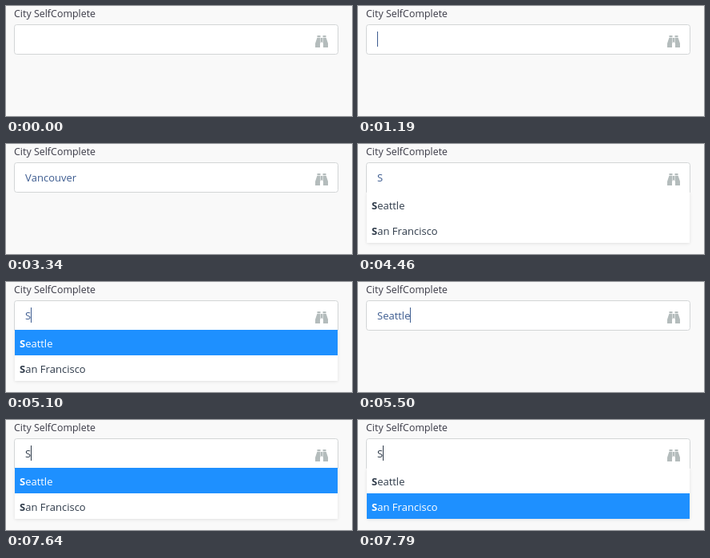
An HTML page with a canvas for the animation above (8000 ms loop, 433 by 138 pixels).

```html
<!DOCTYPE html>
<html lang="en">
<head>
<meta charset="utf-8">
<title>City field</title>
<style>
  html, body { margin: 0; width: 100%; height: 100%; overflow: hidden; background: #f9f9f9; }
  canvas { display: block; }
</style>
</head>
<body>
<canvas id="stage" width="433" height="138"></canvas>
<script>
const ctx = document.getElementById('stage').getContext('2d');
const LOOP = 8000;
const FAMILY = '"Open Sans", "Noto Sans", sans-serif';
const INK = '#2f3b4a', BLUE = '#3d5c90', ACCENT = '#1e90ff';
const TEXT_X = 24, ROW_H = 32, LIST_Y = 60;
const CARET_X = { '': 24, V: 33, S: 31, Vancouver: 88, Seattle: 65 };

// Each step changes only the listed parts of the field.
const EMPTY = { text: '', caret: false, select: null, rows: [], active: -1, ink: BLUE };
const steps = [
  [0, {}],
  [80, { caret: true }],
  [640, { caret: false }],
  [1190, { caret: true }],
  [1760, { text: 'V', rows: ['Vancouver'], ink: INK }],
  [2310, { caret: false }],
  [2560, { caret: true, active: 0 }],
  [2790, { caret: false }],
  [3020, { text: 'Vancouver', caret: true, rows: [], active: -1, ink: BLUE }],
  [3340, { caret: false }],
  [3660, { select: [24, 89] }],
  [4460, { text: 'S', select: null, rows: ['Seattle', 'San Francisco'] }],
  [5010, { caret: true }],
  [5100, { active: 0 }],
  [5500, { text: 'Seattle', rows: [], active: -1 }],
  [6060, { caret: false }],
  [6530, { select: [24, 65] }],
  [6760, { select: [31, 65], ink: INK }],
  [7160, { text: 'S', select: null, caret: true, rows: ['Seattle', 'San Francisco'] }],
  [7640, { active: 0 }],
  [7790, { active: 1 }]
];

function stateAt(time) {
  const state = { ...EMPTY };
  for (const [start, change] of steps) {
    if (start > time) break;
    Object.assign(state, change);
  }
  return state;
}

function rect(x, y, w, h, color) {
  ctx.fillStyle = color;
  ctx.fillRect(x, y, w, h);
}

function label(text, x, y, color, size = 13, weight = 400) {
  ctx.font = `${weight} ${size}px ${FAMILY}`;
  ctx.fillStyle = color;
  ctx.fillText(text, x, y);
  return ctx.measureText(text).width;
}

function polygon(points) {
  ctx.beginPath();
  points.forEach(([x, y]) => ctx.lineTo(x, y));
  ctx.closePath();
  ctx.fill();
}

function drawBinoculars() {
  ctx.fillStyle = '#b4bcbc';
  for (const side of [-1, 1]) {
    ctx.save();
    ctx.translate(395, 37);
    ctx.scale(side, 1);
    ctx.fillRect(1.5, 0, 4, 2.3);
    polygon([[1.5, 3], [5.7, 3], [8, 10], [8, 15], [2, 15], [2, 9.5], [1.5, 9.5]]);
    ctx.restore();
  }
  ctx.fillRect(394, 40, 2, 5.5);
}

function drawField(state) {
  const open = state.rows.length > 0;
  ctx.beginPath();
  ctx.roundRect(10.5, 23.5, 405, 37, open ? [3, 3, 0, 0] : 3);
  ctx.fillStyle = '#fff';
  ctx.fill();
  ctx.strokeStyle = '#d2d5d6';
  ctx.lineWidth = 1;
  ctx.stroke();
  drawBinoculars();

  label(state.text, TEXT_X, 47, state.ink);
  if (state.select) {
    const [left, right] = state.select;
    ctx.save();
    ctx.beginPath();
    ctx.rect(left, 32, right - left, 19);
    ctx.clip();
    rect(left, 32, right - left, 19, '#3399ff');
    label(state.text, TEXT_X, 47, '#fff');
    ctx.restore();
  }
  if (state.caret) rect(CARET_X[state.text], 32, 1, 19, state.ink);
}

function drawList({ rows, active }) {
  if (!rows.length) return;
  ctx.save();
  ctx.shadowColor = 'rgba(0, 0, 0, 0.1)';
  ctx.shadowBlur = 4;
  ctx.shadowOffsetY = 1;
  ctx.beginPath();
  ctx.rect(0, LIST_Y, 433, 78);
  ctx.clip();
  rect(11, LIST_Y, 404, rows.length * ROW_H, '#fff');
  ctx.restore();

  rows.forEach((name, i) => {
    const y = LIST_Y + i * ROW_H;
    const on = i === active;
    if (on) rect(11, y, 404, ROW_H, ACCENT);
    const color = on ? '#fff' : INK;
    const width = label(name[0], 17, y + 22, color, 13, 700);
    label(name.slice(1), 17 + width, y + 22, color);
  });
}

function frame(now) {
  const state = stateAt(now % LOOP);
  rect(0, 0, 433, 138, '#f9f9f9');
  ctx.fontKerning = 'none';
  label('City SelfComplete', 10, 14, '#3c3c48', 12.45);
  drawField(state);
  drawList(state);
  requestAnimationFrame(frame);
}
requestAnimationFrame(frame);
</script>
</body>
</html>
```
